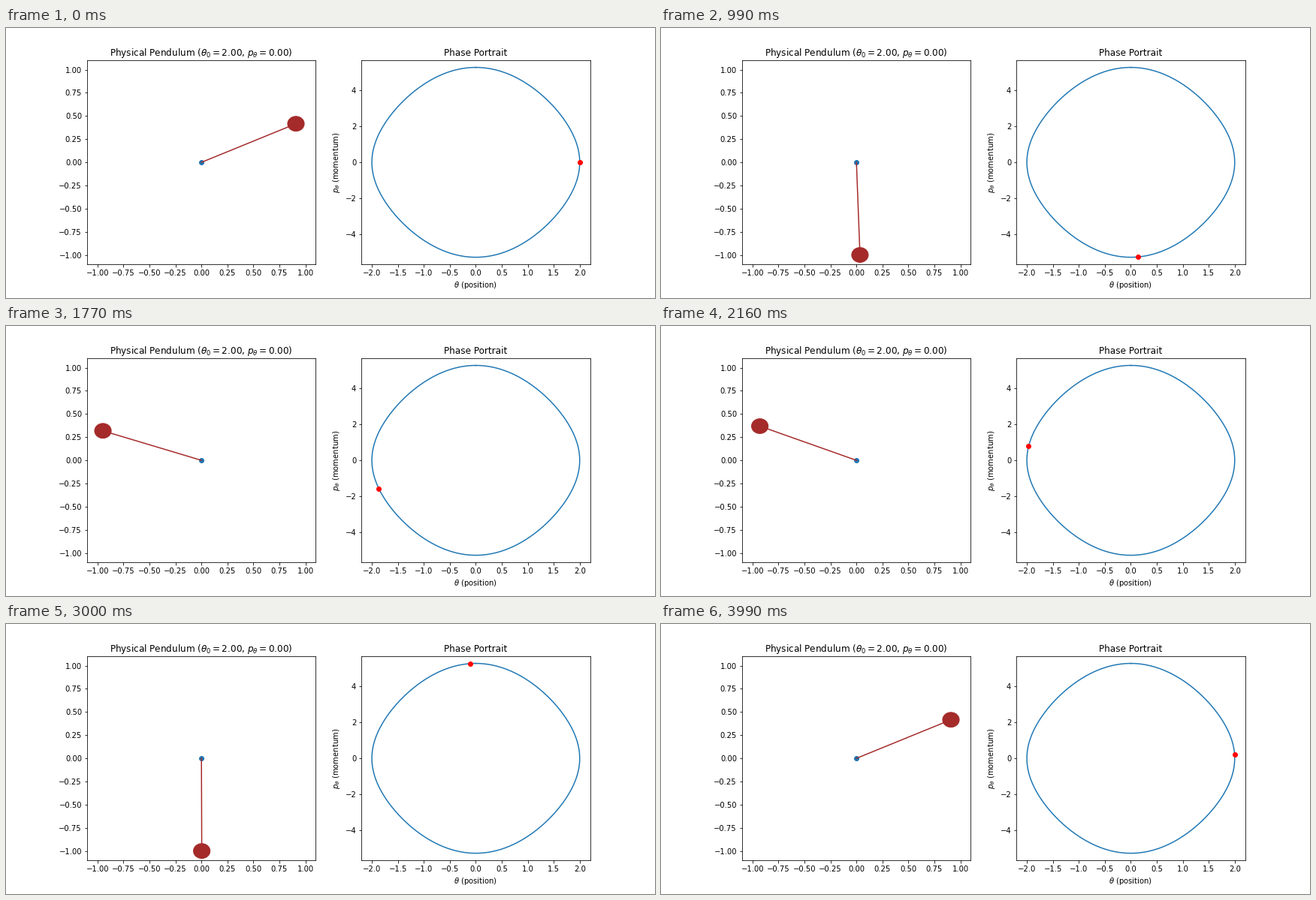
These frames come from a looping animation (864x360 px, 4020 ms). A matplotlib script:

```python
import numpy as np
import matplotlib.pyplot as plt
from matplotlib.animation import FuncAnimation
from matplotlib.patches import Circle

FRAMES, INTERVAL = 134, 30
G, DT, SUBSTEPS = 9.81, 0.02, 4
THETA0, P0 = 2.0, 0.0


def flow(s):
    return np.array([s[1], -G * np.sin(s[0])])


def rk4(s, h):
    a = flow(s)
    b = flow(s + h / 2 * a)
    c = flow(s + h / 2 * b)
    d = flow(s + h * c)
    return s + h / 6 * (a + 2 * b + 2 * c + d)


def simulate(n):
    states = [np.array([THETA0, P0])]
    for _ in range(n - 1):
        s = states[-1]
        for _ in range(SUBSTEPS):
            s = rk4(s, DT / SUBSTEPS)
        states.append(s)
    return np.array(states)


def orbit(n=400):
    """Closed energy level through the starting state."""
    phi = np.linspace(0, 2 * np.pi, n)
    k = np.sin(THETA0 / 2)
    return 2 * np.arcsin(k * np.sin(phi)), 2 * np.sqrt(G) * k * np.cos(phi)


states = simulate(FRAMES)

plt.rcParams.update({"font.family": "DejaVu Sans", "font.size": 10})
fig, (ax, phase) = plt.subplots(1, 2, figsize=(12, 5), dpi=72)
fig.subplots_adjust(left=0.125, right=0.9, bottom=0.125, top=0.88, wspace=0.2)

ax.set_title(rf"Physical Pendulum ($\theta_0={THETA0:.2f}$, $p_\theta={P0:.2f}$)")
ax.set_xticks(np.arange(-1, 1.01, 0.25))
ax.set_yticks(np.arange(-1, 1.01, 0.25))
ax.set_xlim(-1.1, 1.1)
ax.set_ylim(-1.1, 1.1)
ax.scatter([0], [0], color="C0")
rod, = ax.plot([], [], color="brown", lw=1.5)
bob = ax.add_patch(Circle((0, 0), 0.08, color="brown"))

phase.set_title("Phase Portrait")
phase.set_xlabel(r"$\theta$ (position)")
phase.set_ylabel(r"$p_\theta$ (momentum)")
phase.plot(*orbit(), color="C0", lw=1.5)
dot, = phase.plot([], [], "ro", ms=6)
phase.set_xticks(np.arange(-2, 2.01, 0.5))
phase.set_yticks(np.arange(-4, 4.01, 2))
phase.set_xlim(-2.2, 2.2)
phase.set_ylim(-5.66, 5.66)


def update(i):
    theta = states[i, 0]
    x, y = np.sin(theta), -np.cos(theta)
    rod.set_data([0, x], [0, y])
    bob.center = x, y
    # the phase marker trails the pendulum by one step
    q, p = states[max(i - 1, 0)]
    dot.set_data([q], [p])
    return rod, bob, dot


anim = FuncAnimation(fig, update, frames=FRAMES, init_func=lambda: update(0),
                     interval=INTERVAL, repeat=True, repeat_delay=0)
plt.show()
```
